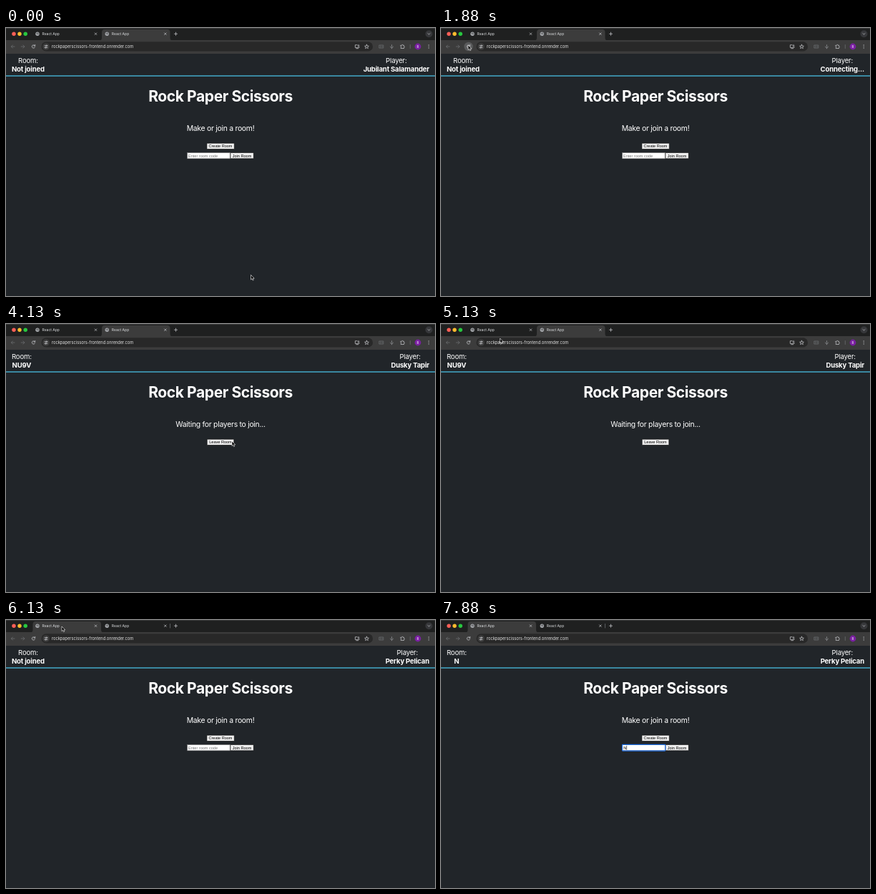
Recreate the animation shown at these times as an HTML page. Size 600 by 375 pixels, loop 8 s.

```html
<!DOCTYPE html>
<html lang="en">
<head>
<meta charset="utf-8">
<title>Rock Paper Scissors</title>
<style>
  html, body { margin: 0; width: 100%; height: 100%; overflow: hidden; background: #212529; }
  #stage { position: absolute; left: 0; top: 0; width: 600px; height: 375px; overflow: hidden; color: #fff; }
  svg { position: absolute; left: 0; top: 0; }
  text { font-family: Inter, "Open Sans", sans-serif; fill: #fff; }
  .info { position: absolute; top: 40px; text-align: center; white-space: nowrap;
          font: 9.6px/11.5px Inter, "Open Sans", sans-serif; letter-spacing: -.2px; }
  .info b { display: block; font-weight: 700; }
  .mid { text-anchor: middle; }
  .title { font-size: 21px; font-weight: 700; letter-spacing: -.4px; }
  .lead { font-size: 10.4px; letter-spacing: -.27px; }
  .tab text { font-size: 5px; fill: #dfe1e3; }
  .url { font-size: 5.7px; fill: #e3e3e3; }
  .form text { font: 5.55px "Liberation Sans", Arial, sans-serif; fill: #000; }
  .form text.hint { fill: #757575; }
  .form rect { fill: #efefef; stroke: #000; stroke-width: .6; }
  .form rect.field { fill: #fff; stroke: #767676; }
  .form rect.ring { fill: none; stroke: #1f6fe5; stroke-width: 1.2; }
  .icon { fill: none; stroke: #c7c9cc; stroke-width: .75; stroke-linecap: round; stroke-linejoin: round; }
  .dim { stroke: #6d6f72; }
</style>
</head>
<body>
<div id="stage">
  <svg width="600" height="375" viewBox="0 0 600 375">
    <defs>
      <g id="globe">
        <circle r="2.7" fill="#a9acb0"/>
        <path d="M-1.8-1 L0-.4 L-.4 1.2 M.6-2 L1 0 L2 .8" fill="none" stroke="#3c3c3c" stroke-width=".7"/>
      </g>
      <path id="close" class="icon" d="M-1.3-1.3 L1.3 1.3 M1.3-1.3 L-1.3 1.3"/>
    </defs>

    <rect width="600" height="375" fill="#212529"/>
    <rect y="66.3" width="600" height="1.4" fill="#45b2d3"/>

    <!-- tab strip -->
    <rect width="600" height="17.5" fill="#1f2020"/>
    <rect width="600" height=".6" fill="#4b4c4d"/>
    <circle cx="11" cy="8.2" r="2.7" fill="#ff5f57"/>
    <circle cx="19" cy="8.2" r="2.7" fill="#febc2e"/>
    <circle cx="27.2" cy="8.2" r="2.7" fill="#28c840"/>
    <rect id="tabHover" x="37.5" y="2" width="95.5" height="12.5" rx="4" fill="#0a4574"/>
    <path id="activeTab" d="M130.5 17.5 q3.5 0 3.5-4 V6 q0-4 4-4 H225.5 q4 0 4 4 V13.5 q0 4 3.5 4Z" fill="#3c3c3c"/>
    <g class="tab">
      <use href="#globe" x="44" y="8.2"/><text x="50.5" y="10">React App</text><use href="#close" x="125.5" y="8.2"/>
    </g>
    <g class="tab" transform="translate(97.3)">
      <use href="#globe" x="44" y="8.2"/><text x="50.5" y="10">React App</text><use href="#close" x="125.5" y="8.2"/>
    </g>
    <path id="divider" class="icon dim" d="M229.5 5.5V11"/>
    <path class="icon" d="M235.4 8.2H239.6M237.5 6.1V10.3"/>
    <circle cx="591.5" cy="8.2" r="5" fill="#36373a"/>
    <path class="icon" d="M589.9 7.5 L591.5 9 L593.1 7.5"/>

    <!-- toolbar -->
    <rect y="17" width="600" height="19" fill="#3c3c3c"/>
    <rect x="49.5" y="19.3" width="463.5" height="13.2" rx="6.6" fill="#282828"/>
    <circle id="reloadHover" cx="38.5" cy="26" r="6.2" fill="#5a5b5c"/>
    <path class="icon dim" d="M12 26H7.4M9.4 23.9L7.3 26L9.4 28.1M21.2 26H25.8M23.8 23.9L25.9 26L23.8 28.1"/>
    <path class="icon" d="M40.5 25A2.2 2.2 0 1 0 40.5 26.9M40.7 23.3V25.1H38.9"/>
    <circle cx="56" cy="26" r="4.8" fill="#3c3c3c"/>
    <path class="icon" d="M54 24.8H55.6M57.4 24.8H58M54 27.4H54.6M56.4 27.4H58"/>
    <circle class="icon" cx="56.5" cy="24.8" r=".8"/><circle class="icon" cx="55.5" cy="27.4" r=".8"/>
    <text class="url" x="64" y="28">rockpaperscissors-frontend.onrender.com</text>
    <path class="icon" d="M491 23.7H488.4V27.4H494V26.3M489.8 28.7H492.6M493 23.3V25.4M492 24.7L493 25.7L494 24.7"/>
    <path class="icon" d="M504.5 23.2L505.3 25.1L507.4 25.3L505.8 26.6L506.3 28.6L504.5 27.5L502.7 28.6L503.2 26.6L501.6 25.3L503.7 25.1Z"/>
    <path class="icon dim" d="M522.2 24H527.8V28H522.2ZM523.7 25V27M525.2 26H527"/>
    <path class="icon" style="stroke:#929497" d="M539.5 23.6V26M537.7 26A1.8 1.8 0 0 0 541.3 26M539.5 27.8V28.8"/>
    <path class="icon" d="M552.2 24.3H553.6A.9.9 0 0 1 555.4 24.3H556.5V25.6A.9.9 0 0 1 556.5 27.4V28.5H552.2V27.3A.9.9 0 0 0 552.2 25.6Z"/>
    <path class="icon dim" d="M565.3 23.5V28.5"/>
    <circle cx="576" cy="26" r="4.4" fill="#7a1fa2"/>
    <text class="mid" x="576" y="27.6" font-size="4.4">R</text>
    <g fill="#c7c9cc"><circle cx="591.2" cy="23.9" r=".6"/><circle cx="591.2" cy="26" r=".6"/><circle cx="591.2" cy="28.1" r=".6"/></g>

    <!-- page -->
    <text class="mid title" x="300" y="103.2">Rock Paper Scissors</text>
    <g id="lobby">
      <text class="mid lead" x="300" y="143.8">Make or join a room!</text>
      <g class="form">
        <rect id="createButton" x="280.9" y="161.2" width="38.4" height="8.3" rx=".6"/>
        <text class="mid" x="300" y="167.3">Create Room</text>
        <rect class="field" x="253.6" y="174.6" width="60" height="8.2"/>
        <rect x="313.8" y="174.4" width="32.5" height="8.4" rx=".6"/>
        <text class="mid" x="330" y="180.5">Join Room</text>
        <text id="hint" class="hint" x="255" y="180.5">Enter room code</text>
        <text id="typed" x="255.3" y="180.5">N</text>
        <g id="focus">
          <rect class="ring" x="253.5" y="174.4" width="60.2" height="8.7" rx=".8"/>
          <path id="caret" d="M0 175.7V181.7" stroke="#000" stroke-width=".5"/>
        </g>
      </g>
    </g>
    <g id="waiting">
      <text class="mid lead" x="300" y="143.8">Waiting for players to join...</text>
      <g class="form">
        <rect x="281.2" y="161.2" width="37.6" height="8.3" rx=".6"/>
        <text class="mid" x="300" y="167.3">Leave Room</text>
      </g>
    </g>
  </svg>

  <div class="info" style="left:8px">Room:<b id="room"></b></div>
  <div class="info" style="right:8px">Player:<b id="player"></b></div>

  <svg width="600" height="375" viewBox="0 0 600 375">
    <g id="cursor">
      <path id="arrow" d="M0 0V6.6L1.5 5.2L2.6 7.6L3.7 7.1L2.7 4.8H4.7Z" fill="#000" stroke="#fff" stroke-width=".6" stroke-linejoin="round"/>
      <path id="beam" d="M-1-3Q0-3 0-2V2Q0 3-1 3M1-3Q0-3 0-2M0 2Q0 3 1 3" fill="none" stroke="#333" stroke-width=".6"/>
    </g>
  </svg>
</div>

<script>
  const LOOP = 8000, STEP = 125;
  const JOIN = 3750, SWITCH = 6125, FOCUS = 7125, TYPE = 7750;

  const players = [[0, 'Jubilant Salamander'], [1500, 'Connecting...'], [2375, 'Dusky Tapir'], [SWITCH, 'Perky Pelican']];
  const rooms = [[0, 'Not joined'], [JOIN, 'NU9V'], [SWITCH, 'Not joined'], [TYPE, 'N']];

  // Pointer moves: start, end, destination x, y
  const home = [342.5, 345.5];
  const moves = [
    [125, 250, 101, 127],
    [375, 875, 43.5, 14.5],
    [875, 1250, 38, 24],
    [2125, 2875, 316, 164],
    [4250, 5125, 82.5, 20],
    [5125, 5625, 78, 9],
    [SWITCH, 6875, 284, 190],
    [6875, FOCUS, 283, 178.5],
  ];

  const $ = id => document.getElementById(id);
  const show = (id, on) => { $(id).style.display = on ? '' : 'none'; };
  const between = (t, a, b) => t >= a && t < b;
  const latest = (list, t) => list.filter(([at]) => at <= t).pop()[1];
  const ramp = (t, a, b) => Math.min(1, Math.max(0, (t - a) / (b - a)));
  const ease = p => p * p * (3 - 2 * p);

  function pointer(t) {
    let [x, y] = home;
    for (const [start, end, toX, toY] of moves) {
      const p = ease(ramp(t, start, end));
      x += (toX - x) * p;
      y += (toY - y) * p;
    }
    return [x, y];
  }

  function draw(t) {
    const waiting = between(t, JOIN, SWITCH), typed = t >= TYPE;
    $('room').textContent = latest(rooms, t);
    $('player').textContent = latest(players, t);

    show('lobby', !waiting);
    show('waiting', waiting);
    show('hint', !typed);
    show('typed', typed);
    show('focus', t >= FOCUS);
    $('caret').setAttribute('transform', `translate(${typed ? 259.7 : 255.4})`);
    $('createButton').style.fill = between(t, 2875, JOIN) ? '#e5e5e5' : '';

    const firstTab = t >= SWITCH;
    $('activeTab').setAttribute('transform', `translate(${firstTab ? -96.5 : 0})`);
    show('divider', firstTab);
    $('tabHover').style.opacity =
      between(t, 625, 1000) ? ramp(t, 500, 750) : between(t, 5375, SWITCH) ? ramp(t, 5250, 5500) : 0;
    show('reloadHover', between(t, 1125, 2375));

    const [x, y] = pointer(t);
    const overField = !waiting && between(x, 254, 313) && between(y, 174.5, 183);
    $('cursor').setAttribute('transform', `translate(${x} ${y})`);
    show('cursor', !typed);
    show('arrow', !overField);
    show('beam', overField);
  }

  const begin = performance.now();
  function tick() {
    const t = (performance.now() - begin) % LOOP;
    draw(Math.floor(t / STEP) * STEP);
    requestAnimationFrame(tick);
  }
  tick();
</script>
</body>
</html>
```
